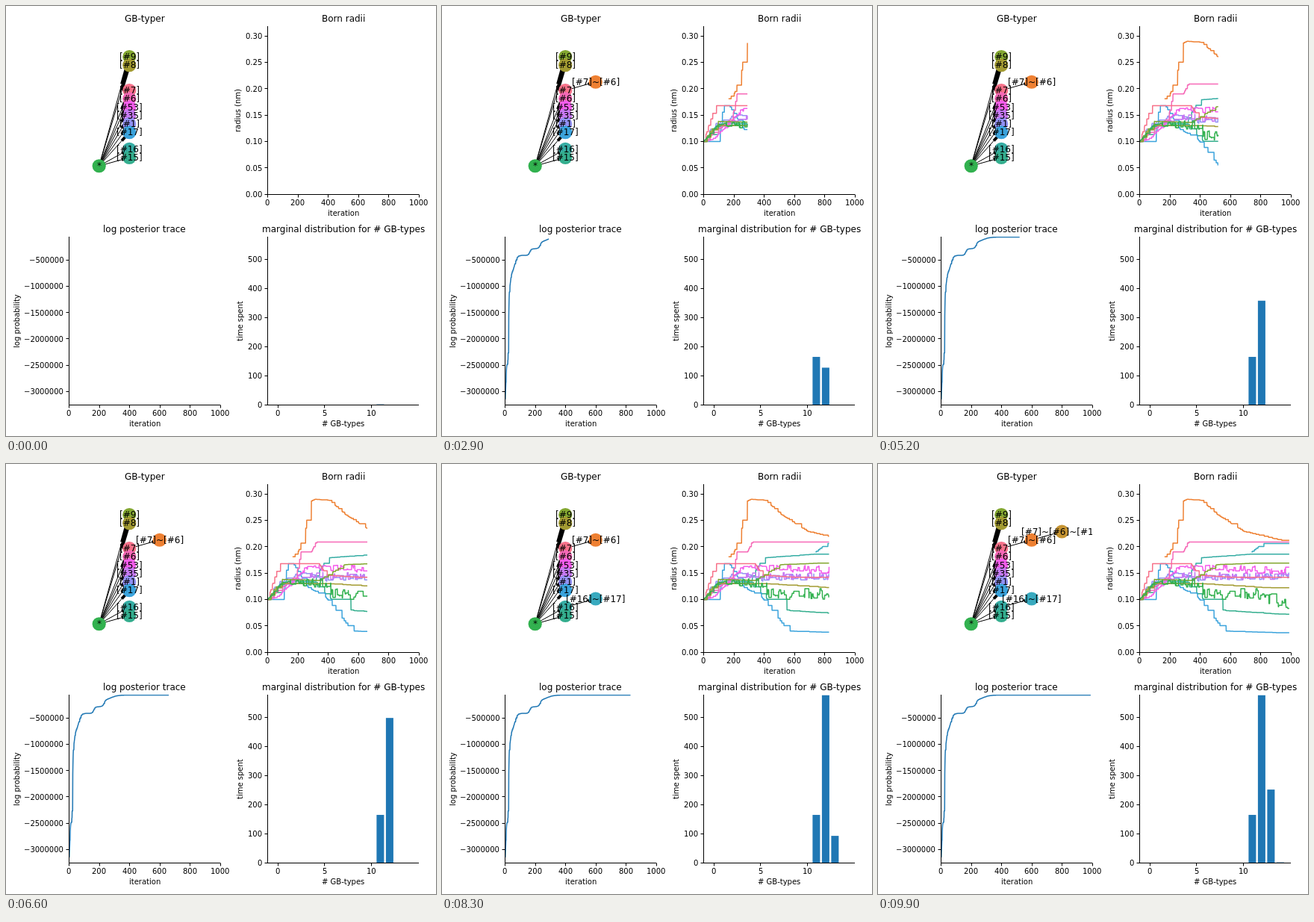
These frames come from a looping animation (576 px wide and 576 px high, 10 s). An HTML page with a canvas:

```html
<!DOCTYPE html>
<html lang="en">
<head>
<meta charset="utf-8">
<title>GB-typer</title>
<style>
html, body { margin: 0; width: 100%; height: 100%; overflow: hidden; background: #fff; }
canvas { display: block; }
</style>
</head>
<body>
<canvas id="stage" width="576" height="576"></canvas>
<script>
const ctx = document.getElementById('stage').getContext('2d');
const FONT = 'px "DejaVu Sans", Verdana, sans-serif';
const BLUE = '#1f77b4';
const STEP = 100, FRAMES = 100;
const SPLITS = [0, 164, 739, 990]; // iterations at which a type is added

// Listed from top to bottom; the number of parts in a label gives its column.
const nodes = [
  ['[#9]', '#83a731'], ['[#8]', '#a39b32'],
  ['[#7]~[#6]~[#17]', '#c69432', SPLITS[3]], ['[#7]~[#6]', '#ee8032', SPLITS[1]],
  ['[#7]', '#f77189'], ['[#6]', '#f669b7'], ['[#53]', '#f45deb'], ['[#35]', '#c87af4'],
  ['[#1]', '#9391f4'], ['[#17]', '#3ba3dc'], ['[#16]~[#17]', '#38aabf', SPLITS[2]],
  ['[#16]', '#36ada4'], ['[#15]', '#34ae8e'], ['*', '#32b14f']
].map(([label, color, born = 0], row) => {
  const parts = label === '*' ? [] : label.split('~');
  const parent = parts.length && (parts.slice(0, -1).join('~') || '*');
  return { label, color, born, parent, x: 124.7 + parts.length * 40.55, y: 68 + row * 11.25 };
});
const byLabel = Object.fromEntries(nodes.map(n => [n.label, n]));

let seed = 7;
const random = () => (seed = seed * 16807 % 2147483647) / 2147483647;

// Holds a value and moves it to follow target(i) at random moments.
function staircase(start, pace, target) {
  const values = [];
  for (let i = start; i <= 1000; i++)
    values[i] = i === start || random() < pace ? target(i) : values[i - 1];
  return { start, values };
}

function along(points, i) {
  const next = points.findIndex(p => p[0] > i);
  if (next < 0) return points[points.length - 1][1];
  const [a, from] = points[next - 1], [b, to] = points[next];
  return from + (to - from) * (i - a) / (b - a);
}

// Radii in thousandths of a nanometre, as [iteration, radius] key points.
const radii = [];
function trace(label, pace, jitter, ...points) {
  if (!byLabel[label].born) points.unshift([0, 100]);
  const target = i => along(points, i) + (random() - 0.5) * jitter * Math.min(1, i / 400);
  radii.push({ color: byLabel[label].color, ...staircase(points[0][0], pace, target) });
}
trace('[#1]', 0.1, 12, [60, 130], [240, 153], [330, 140], [1000, 145]);
trace('[#15]', 0.06, 0, [110, 130], [300, 132], [440, 96], [560, 79], [930, 72]);
trace('[#16]', 0.06, 0, [100, 135], [300, 134], [395, 179], [735, 186]);
trace('[#17]', 0.07, 0, [103, 100], [130, 168], [170, 168], [270, 122], [380, 106], [560, 40], [900, 37]);
trace('[#35]', 0.1, 14, [80, 125], [260, 146], [1000, 142]);
trace('[#53]', 0.1, 14, [60, 104], [260, 160], [1000, 155]);
trace('[#6]', 0.1, 0, [190, 145], [222, 190], [290, 190], [320, 209]);
trace('[#7]', 0.1, 0, [78, 168], [340, 168], [390, 146], [600, 142]);
trace('[#8]', 0.06, 0, [90, 130], [400, 130], [850, 122]);
trace('[#9]', 0.07, 0, [90, 138], [340, 136], [510, 166], [770, 169]);
trace('*', 0.1, 22, [100, 133], [400, 130], [440, 109], [780, 110], [1000, 86]);
trace('[#7]~[#6]', 0.08, 0, [165, 181], [205, 192], [255, 238], [270, 284], [312, 290], [410, 288], [520, 260], [690, 229], [940, 212]);
trace('[#16]~[#17]', 0.08, 0, [740, 190], [815, 206]);

// Negative log probability in thousands: drops of [size, iteration, width].
const drops = [[700, 6, 2], [1400, 24, 1.7], [350, 37, 4], [320, 66, 8], [120, 163, 5], [110, 232, 5], [120, 270, 25]];
const posterior = staircase(0, 0.5, i =>
  drops.reduce((sum, [size, at, width]) => sum + size / (1 + Math.exp((i - at) / width)), 60));

function line(x1, y1, x2, y2, width = 1) {
  ctx.lineWidth = width;
  ctx.beginPath();
  ctx.moveTo(x1, y1);
  ctx.lineTo(x2, y2);
  ctx.stroke();
}

// Text starts on whole pixels; anchor is 0.5 for centred, 1 for right-aligned.
function text(str, x, y, size = 10, anchor = 0.5) {
  ctx.font = size + FONT;
  ctx.fillText(str, Math.round(x - ctx.measureText(str).width * anchor), Math.round(y));
}

function clipped(x, y, draw) {
  ctx.save();
  ctx.beginPath();
  ctx.rect(x, y, 203, 225);
  ctx.clip();
  draw();
  ctx.restore();
}

function axes(left, base, title, xName, yName, yNameX, xTicks, yTicks) {
  ctx.strokeStyle = ctx.fillStyle = '#000';
  line(left, base - 225.5, left, base + 0.5);
  line(left - 0.5, base, left + 202.5, base);
  for (const [label, x] of xTicks) {
    const tx = Math.floor(x) + 0.5;
    line(tx, base, tx, base + 4);
    text(label, x, base + 14.5);
  }
  for (const [label, y] of yTicks) {
    const ty = Math.floor(y) + 0.5;
    line(left - 4, ty, left, ty);
    text(label, left - 7.3, y + 3.8, 10, 1);
  }
  text(title, left + 101.2, base - 231.5, 12);
  text(xName, left + 101.2, base + 28.5);
  ctx.save();
  ctx.translate(yNameX, Math.round(base - 112.5));
  ctx.rotate(-Math.PI / 2);
  text(yName, 0, 0);
  ctx.restore();
}

const range = (n, tick) => Array.from({ length: n }, (_, i) => tick(i));
const iterTicks = left => range(6, i => [i * 200, left + i * 40.5]);

function curve({ start, values }, now, left, toY) {
  ctx.lineWidth = 1.5;
  ctx.lineJoin = 'round';
  ctx.beginPath();
  for (let i = start; i <= now; i++) ctx.lineTo(left + i * 0.2025, toY(values[i]));
  ctx.stroke();
}

function drawTree(now) {
  const shown = nodes.filter(n => n.born <= now);
  ctx.strokeStyle = '#000';
  for (const n of shown) {
    const p = byLabel[n.parent];
    if (!p) continue;
    line(p.x, p.y, n.x, n.y);
    line(n.x + (p.x - n.x) / 4, n.y + (p.y - n.y) / 4, n.x, n.y, 4);
  }
  for (const n of shown) {
    ctx.fillStyle = n.color;
    ctx.beginPath();
    ctx.arc(n.x, n.y, 9.1, 0, 7);
    ctx.fill();
  }
  ctx.fillStyle = '#000';
  for (const n of shown) text(n.label, n.x, n.y + 4.2, 12);
}

function drawBars(now) {
  ctx.fillStyle = BLUE;
  SPLITS.forEach((from, i) => {
    const count = Math.min(now + 1, SPLITS[i + 1] || 1000) - from;
    if (count > 0) ctx.fillRect(496.4 + i * 12.5, 534 - count * 0.39, 10, count * 0.39);
  });
}

function draw(now) {
  ctx.fillStyle = '#fff';
  ctx.fillRect(0, 0, 576, 576);

  clipped(84, 27, () => drawTree(now));
  ctx.fillStyle = '#000';
  text('GB-typer', 185.7, 21, 12);

  if (now) {
    clipped(350, 27, () => radii.forEach(r => {
      ctx.strokeStyle = r.color;
      curve(r, now, 350.4, v => 252 - v * 0.706);
    }));
    clipped(84, 309, () => {
      ctx.strokeStyle = BLUE;
      curve(posterior, now, 84.4, v => 305.2 + v * 0.0703);
    });
  }
  clipped(350, 309, () => drawBars(now));

  axes(350.5, 252.5, 'Born radii', 'iteration', 'radius (nm)', 314, iterTicks(350.5),
    range(7, i => [(i * 0.05).toFixed(2), 252 - i * 35.3]));
  axes(84.5, 534.5, 'log posterior trace', 'iteration', 'log probability', 18, iterTicks(84.5),
    range(6, i => ['\u2212' + (i + 1) * 500000, 340.4 + i * 35.15]));
  axes(350.5, 534.5, 'marginal distribution for # GB-types', '# GB-types', 'time spent', 317,
    range(3, i => [i * 5, 364.2 + i * 62.5]),
    range(6, i => [i * 100, 534 - i * 39]));
}

let last = -1;
const begin = performance.now();
function tick() {
  const frame = Math.floor((performance.now() - begin) / STEP) % FRAMES;
  if (frame !== last) draw((last = frame) * 10);
  requestAnimationFrame(tick);
}
tick();
</script>
</body>
</html>
```
